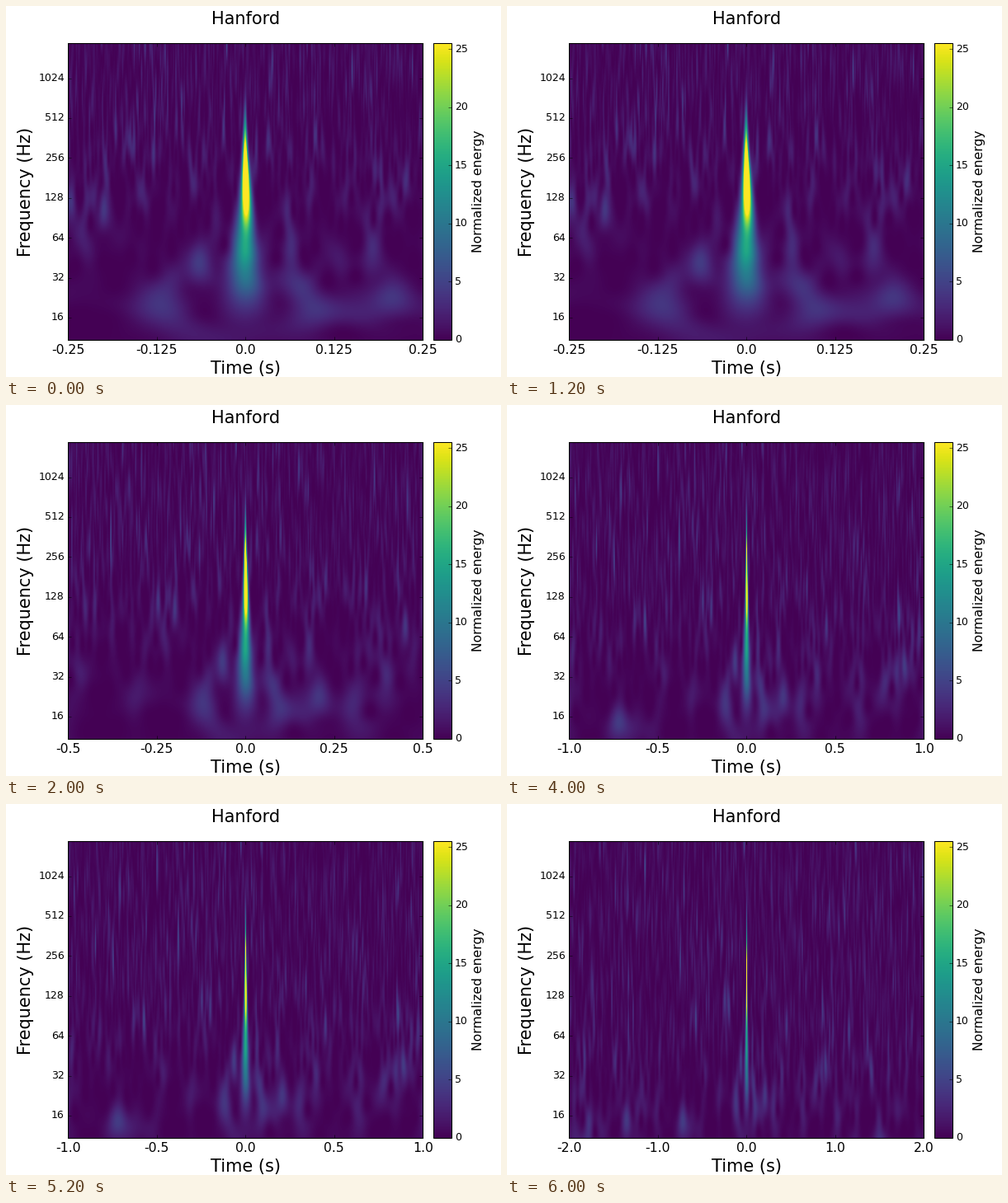
A matplotlib script for the animation above (8 s loop, 600 px wide and 450 px high).

```python
import matplotlib.pyplot as plt
import numpy as np
from matplotlib.animation import FuncAnimation

plt.style.use("classic")
plt.rcParams.update({"font.family": "DejaVu Sans", "savefig.dpi": 75})

WIDTH, HEIGHT = 600, 450
SPANS = [0.25, 0.5, 1.0, 2.0]          # half-width of the time window, s
OCT_LO, OCT_HI = 3.442, 10.88          # log2 of the frequency limits
COLS, ROWS = 431, 180
RATE, LENGTH = 4096, 8                 # noise sampling, Hz and s
VMAX = 25.5

octaves = np.linspace(OCT_LO, OCT_HI, ROWS)[:, None]
freqs = 2.0 ** octaves

# Loudest noise bursts: time (s), log2 frequency
BURSTS = [(-0.064, 5.3), (-0.2, 6.7), (-0.247, 6.9), (0.205, 4.5), (0.45, 6.25),
          (-0.573, 6.4), (0.889, 5.25), (-0.72, 3.8), (1.155, 6.05), (-1.35, 3.85)]


def bell(x, width):
    return np.exp(-0.5 * (x / width) ** 2)


def noise_energy():
    """Q-transform energy of seeded white noise, one row per frequency."""
    rng = np.random.default_rng(14)
    size = RATE * LENGTH
    spectrum = rng.normal(size=size) + 1j * rng.normal(size=size)
    bins = np.arange(size) / LENGTH
    rows = []
    for freq in freqs[:, 0]:
        energy = np.abs(np.fft.ifft(spectrum * bell(bins - freq, freq / 3.5))) ** 2
        rows.append(0.7 * energy / energy.mean())
    return np.array(rows)


NOISE = noise_energy()


def noise_at(times):
    coarse = np.linspace(times[0], times[-1], 301)
    index = np.round((coarse + LENGTH / 2) * RATE).astype(int)
    return np.array([np.interp(times, coarse, row[index]) for row in NOISE])


def bursts_at(times, pixel):
    width = np.maximum(0.5 / freqs, 1.1 * pixel)
    return sum(4 * bell(times - t, width) * bell(octaves - octave, 0.33)
               for t, octave in BURSTS)


def chirp_at(times, pixel):
    """Bright core over a wide low-frequency foot, narrowing as it rises."""
    peak = 42 * bell(octaves - 7.5, 0.85) + 10 * bell(octaves - 5.3, 0.75)
    width = 0.0046 * 2 ** (-0.8 * (octaves - 7.06))
    delay = 0.001 * np.tanh(7.5 - octaves)
    sampling_loss = width / np.hypot(width, 0.35 * pixel)
    return peak * sampling_loss * bell(times - delay, width)


def spectrogram(span):
    times = np.linspace(-span, span, COLS)
    pixel = 2 * span / COLS
    return noise_at(times) + bursts_at(times, pixel) + chirp_at(times, pixel)


def pixel_axes(left, top, right, bottom):
    return fig.add_axes([left / WIDTH, 1 - bottom / HEIGHT,
                         (right - left) / WIDTH, (bottom - top) / HEIGHT])


fig = plt.figure(figsize=(WIDTH / 75, HEIGHT / 75), dpi=75, facecolor="white")
ax = pixel_axes(75, 45, 505.2, 405)
image = ax.imshow(np.zeros((ROWS, COLS)), cmap="viridis", vmin=0, vmax=VMAX,
                  origin="lower", aspect="auto", interpolation="bilinear",
                  extent=(-1, 1, OCT_LO, OCT_HI))
ax.set_ylim(OCT_LO, OCT_HI)
ax.set_yticks(range(4, 11), [str(2 ** n) for n in range(4, 11)], fontsize=12)
ax.tick_params(axis="x", pad=5)
ax.set_xlabel("Time (s)", fontsize=20)
ax.set_ylabel("Frequency (Hz)", fontsize=20)
fig.text(290.1 / WIDTH, 1 - 22 / HEIGHT, "Hanford", fontsize=20,
         ha="center", va="baseline")

bar = fig.colorbar(image, cax=pixel_axes(517.6, 45, 540, 405), ticks=range(0, 26, 5))
bar.ax.tick_params(labelsize=12)
bar.set_label("Normalized energy", fontsize=15)


def update(frame):
    span = SPANS[frame]
    image.set_data(spectrogram(span))
    image.set_extent((-span, span, OCT_LO, OCT_HI))
    ticks = np.linspace(-span, span, 5)
    ax.set_xticks(ticks, [str(float(t)) for t in ticks], fontsize=15)
    ax.set_xlim(-span, span)
    return [image]


anim = FuncAnimation(fig, update, frames=len(SPANS), interval=2000,
                     repeat=True, repeat_delay=0, blit=False)
plt.show()
```
